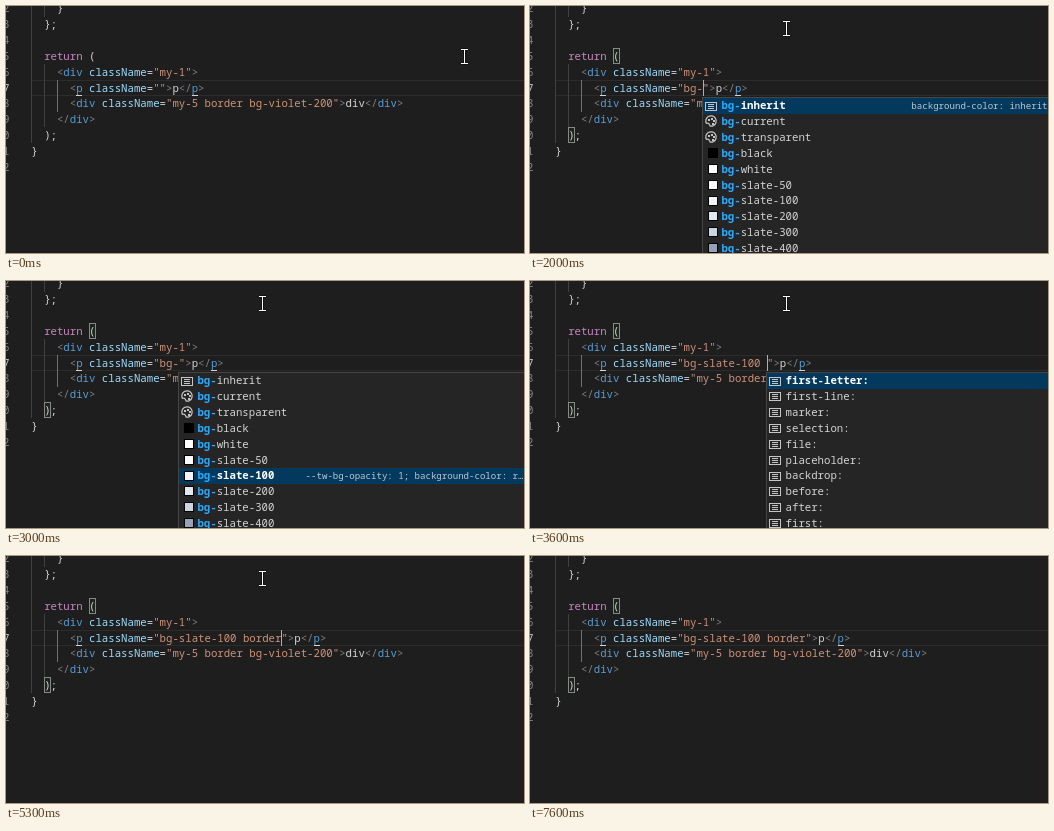
An HTML page with a canvas for the animation above (7.8 s loop, 518 by 247 pixels).

```html
<!DOCTYPE html>
<html lang="en">
<head>
<meta charset="utf-8">
<title>Class name completion</title>
<style>
html, body { margin: 0; width: 518px; height: 247px; overflow: hidden; background: #1e1e1e; }
canvas { display: block; }
</style>
</head>
<body>
<canvas id="stage" width="518" height="247"></canvas>
<script>
const ctx = document.getElementById('stage').getContext('2d', { alpha: false });
const LOOP = 7800, CHAR = 6.414, ROW = 15.84, LEFT = 25.3;
const FAMILY = '"Noto Sans Mono", "DejaVu Sans Mono", monospace';
const PLAIN = '#d4d4d4', GRAY = '#808080', TAG = '#569cd6', ATTR = '#9cdcfe', STRING = '#ce9178', MATCH = '#2aaaff';

const colX = col => LEFT + col * CHAR;
const rowY = row => 2.6 + row * ROW;
const within = (t, spans) => spans.some(([from, to]) => t >= from && t < to);
const latest = (t, steps) => steps.reduce((value, [at, next]) => t >= at ? next : value, steps[0][1]);

const typed = [[0, ''], [1200, 'bg'], [1600, 'bg-'], [3200, 'bg-slate-100'], [3500, 'bg-slate-100 '],
  [4000, 'bg-slate-100 b'], [4100, 'bg-slate-100 bor'], [4200, 'bg-slate-100 bord'],
  [4300, 'bg-slate-100 borde'], [4400, 'bg-slate-100 border']];
const selection = [[0, 0], [2400, 1], [2500, 2], [2600, 3], [2700, 4], [2900, 5], [3000, 6]];
const caretOn = [[300, 800], [1200, 2100], [2600, 3000], [3200, 4900], [5300, 5700], [6200, 6700], [7100, 7600]];
const popupOpen = [[2000, 3200], [3600, 4800]];

const colors = { black: '#000', white: '#fff', 'slate-50': '#f8fafc', 'slate-100': '#f1f5f9',
  'slate-200': '#e2e8f0', 'slate-300': '#cbd5e1', 'slate-400': '#94a3b8' };
const backgrounds = ['inherit', 'current', 'transparent', ...Object.keys(colors)];
const borders = ['collapse', 'separate', ...Array.from({ length: 8 }, (_, i) => 'spacing-' + i)].map(s => 'border-' + s);
const variants = ['first-letter:', 'first-line:', 'marker:', 'selection:', 'file:', 'placeholder:', 'backdrop:', 'before:', 'after:', 'first:'];

function rect(x, y, w, h, color) {
  ctx.fillStyle = color;
  ctx.fillRect(x, y, w, h);
}

function frame(x, y, w, h, color) {
  ctx.strokeStyle = color;
  ctx.lineWidth = 1;
  ctx.strokeRect(x + .5, y + .5, w - 1, h - 1);
}

// Draws [text, color, weight] runs one after another, centred on y.
function write(x, y, runs, size = 10.69) {
  for (const [text, color, weight = 500] of runs) {
    ctx.font = `${weight} ${size}px ${FAMILY}`;
    ctx.fillStyle = color;
    ctx.fillText(text, x, Math.round(y + size * .32 + .35));
    x += text.length * size * .6;
  }
}

const open = (name, value) => [['<', GRAY], [name, TAG], [' className', ATTR], ['=', PLAIN], [`"${value}"`, STRING], ['>', GRAY]];
const close = name => [['</', GRAY], [name, TAG], ['>', GRAY]];

function editor(t, value) {
  for (let row = 0; row < 11; row++)
    write(-3, rowY(row), [[String((row + 2) % 10), row === 5 ? '#c6c6c6' : '#858585']]);
  rect(25, 74, 493, 1, '#2c2c2c');
  rect(25, 89, 493, 1, '#2c2c2c');
  for (const [col, from, to] of [[0, 0, 9], [2, 0, 1], [2, 4, 8], [4, 5, 7]]) {
    const top = Math.round(rowY(from) - ROW / 2);
    rect(Math.round(colX(col)), top, 1, Math.round(rowY(to) - ROW / 2) - top, col === 4 ? '#707070' : '#404040');
  }
  if (t >= 100) {
    for (const [col, row] of [[9, 3], [2, 8]]) {
      const x = Math.floor(colX(col)), y = Math.round(rowY(row) - ROW / 2);
      rect(x, y, 7, 16, '#1c251c');
      frame(x, y, 7, 16, '#888');
    }
  }
  const lines = [
    [0, 4, [['}', PLAIN]]],
    [1, 2, [['};', PLAIN]]],
    [3, 2, [['return', '#c586c0'], [' (', PLAIN]]],
    [4, 4, open('div', 'my-1')],
    [5, 6, [...open('p', value), ['p', PLAIN], ...close('p')]],
    [6, 6, [...open('div', 'my-5 border bg-violet-200'), ['div', PLAIN], ...close('div')]],
    [7, 4, close('div')],
    [8, 2, [[');', PLAIN]]],
    [9, 0, [['}', PLAIN]]]
  ];
  for (const [row, col, runs] of lines) write(colX(col), rowY(row), runs);
  for (const col of [7, 25 + value.length]) rect(Math.round(colX(col)), 89, 6, 1, PLAIN);
}

function listIcon(x, y) {
  frame(x, y - 4, 12, 9, '#c5c5c5');
  for (const dy of [-2, 0, 2]) rect(x + 3, y + dy, 6, 1, '#c5c5c5');
}

function paletteIcon(x, y) {
  ctx.strokeStyle = '#c5c5c5';
  ctx.lineWidth = 1.2;
  ctx.beginPath();
  ctx.arc(x + 6, y, 5.2, 2.6, 8);
  ctx.quadraticCurveTo(x + 4, y + 1, x + 1.5, y + 2.5);
  ctx.stroke();
  for (const [dx, dy] of [[3, -2], [6, -3], [8, -1], [7, 2]]) rect(x + dx, y + dy, 2, 2, '#c5c5c5');
}

function suggestions(word) {
  if (word === 'bg-') {
    return backgrounds.map((name, i) => ({
      label: 'bg-' + name, swatch: colors[name], icon: i ? paletteIcon : listIcon,
      detail: i === 0 ? 'background-color: inherit' : i === 1 ? 'background-color: currentColor'
        : i === 2 ? 'background-color: transparent' : '--tw-bg-opacity: 1; background-color: r…'
    }));
  }
  const labels = !word ? variants : word === 'border' ? ['border', ...borders.slice(0, 9)] : borders;
  return labels.map(label => ({
    label, icon: listIcon,
    detail: !word ? '' : label === 'border' ? 'border-width: 1px' : 'border-collapse: collapse'
  }));
}

function popup(left, word, selected) {
  const x = Math.floor(left);
  rect(x, 91, 347, 200, '#252526');
  frame(x, 91, 347, 200, '#454545');
  suggestions(word).forEach(({ label, swatch, icon, detail }, i) => {
    const y = 99.6 + i * ROW, mid = Math.round(y), active = i === selected;
    if (active) {
      rect(x + 1, mid - 8, 345, 16, '#04395e');
      write(left + 344.8 - detail.length * 5.45, y, [[detail, '#bcc7d0']], 9.08);
    }
    if (swatch) {
      rect(x + 6, mid - 5, 10, 10, '#000');
      rect(x + 7, mid - 4, 8, 8, swatch);
    } else icon(x + 3, mid);
    write(left + 18.6, y, [
      [label.slice(0, word.length), MATCH, 600],
      [label.slice(word.length), active ? '#fff' : PLAIN, active ? 600 : 500]
    ]);
  });
}

function tooltip(opacity) {
  ctx.globalAlpha = opacity;
  rect(236, 19, 144, 55, '#252526');
  frame(236, 19, 144, 55, '#454545');
  write(242, 31, [['.border', '#d7ba7d'], [' {', PLAIN]], 10);
  write(242, 46.5, [['    border-width', ATTR], [': ', PLAIN], ['1px', '#b5cea8'], [';', PLAIN]], 10);
  write(242, 62, [['}', PLAIN]], 10);
  ctx.globalAlpha = 1;
}

// Pointer moves: start, end, from, to.
const moves = [
  [0, 800, [458, 50], [222, 29]],
  [800, 900, [222, 29], [256, 22]],
  [5600, 6000, [256, 22], [260, 81]],
  [7000, 7500, [260, 81], [505, 66]]
];

function pointer(t) {
  if (t >= 7600) return;
  const [start, end, from, to] = moves.filter(move => t >= move[0]).pop();
  const p = Math.min(1, (t - start) / (end - start)), k = p * p * (3 - 2 * p);
  const [x, y] = from.map((v, i) => Math.round(v + (to[i] - v) * k));
  const beam = (grow, color) => {
    rect(x - grow, y - 7 - grow, 1 + 2 * grow, 15 + 2 * grow, color);
    for (const dy of [-7, 7]) {
      rect(x - 3, y + dy - grow, 3, 1 + 2 * grow, color);
      rect(x + 1, y + dy - grow, 3, 1 + 2 * grow, color);
    }
  };
  beam(1, '#111');
  beam(0, '#fff');
}

function draw(now) {
  const t = Math.floor(now % LOOP / 100) * 100;
  const value = latest(t, typed), caret = colX(20 + value.length);
  const hovering = within(t, [[6200, 7200]]);
  rect(0, 0, 518, 247, '#1e1e1e');
  if (hovering) rect(236, 74, 39, 16, '#213040');
  editor(t, value);
  if (within(t, popupOpen)) popup(caret, value.split(' ').pop(), t < 3200 ? latest(t, selection) : 0);
  if (within(t, caretOn)) rect(Math.round(caret), 74, 1, 16, '#aeafad');
  if (hovering) tooltip(t < 6300 ? .5 : 1);
  pointer(t);
}

let began;
function tick(now) {
  began ??= now;
  draw(now - began);
  requestAnimationFrame(tick);
}
requestAnimationFrame(tick);
</script>
</body>
</html>
```
